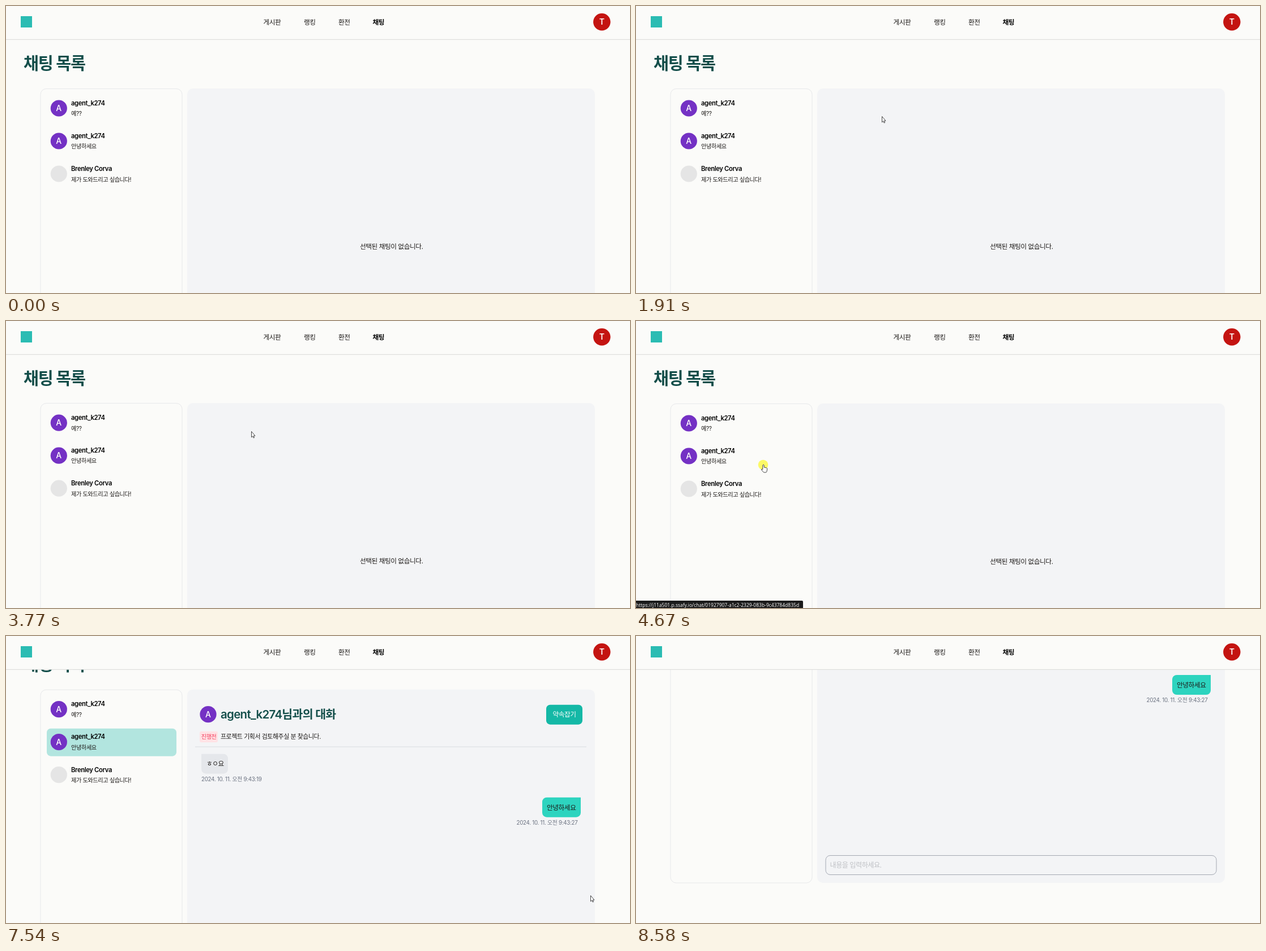
An HTML page that plays this animation: 1102 by 508 pixels, repeating every 9.11 s.

```html
<!DOCTYPE html>
<html lang="ko">
<head>
<meta charset="utf-8">
<title>채팅 목록</title>
<style>
  html, body { margin: 0; width: 100%; height: 100%; overflow: hidden; background: #fbfbf9; }
  svg { display: block; width: 1102px; height: 508px; }
  text { font: 11.7px Inter, "Noto Sans CJK KR", sans-serif; letter-spacing: -.04em; fill: #1c1917; }
  .title { font-size: 29.3px; font-weight: 700; fill: #134e4a; }
  .heading { font-size: 20.5px; font-weight: 600; fill: #134e4a; letter-spacing: -.035em; }
  .name { font-size: 11.2px; font-weight: 600; fill: #000; letter-spacing: -.03em; }
  .small { font-size: 10.2px; }
  .date { font-size: 9.8px; fill: #6b7280; letter-spacing: -.03em; }
  .initial { font-size: 14px; font-weight: 500; fill: #fff; text-anchor: middle; letter-spacing: 0; }
  .link { font: 8.5px "Open Sans", "Noto Sans", sans-serif; fill: #fff; letter-spacing: 0; }
</style>
</head>
<body>
<svg viewBox="0 0 1102 508">
  <defs>
    <g id="avatar">
      <circle r="14.6" fill="#7431c4"/>
      <text class="initial" y="5.2">A</text>
    </g>
  </defs>

  <g id="page">
    <text class="title" x="31" y="112.3">채팅 목록</text>
    <rect x="61" y="146.5" width="250" height="558.5" rx="10" fill="none" stroke="#e7e8ea"/>
    <rect x="320" y="146" width="720" height="559" rx="10" fill="#f3f4f6"/>

    <rect class="chat" x="72" y="215" width="229" height="49" rx="7" fill="#b2e5df"/>
    <use href="#avatar" x="93.3" y="181"/>
    <text class="name" x="115" y="175.8">agent_k274</text>
    <text class="small" x="115" y="194.3">예??</text>
    <use href="#avatar" x="93.3" y="239"/>
    <text class="name" x="115" y="233.8">agent_k274</text>
    <text class="small" x="115" y="252.1">안녕하세요</text>
    <circle cx="93.3" cy="297" r="14.6" fill="#e5e5e5"/>
    <text class="name" x="115" y="292">Brenley Corva</text>
    <text class="small" x="115" y="310.5">제가 도와드리고 싶습니다!</text>

    <text id="empty" x="625" y="429.7">선택된 채팅이 없습니다.</text>

    <g class="chat">
      <use href="#avatar" x="357" y="190"/>
      <text class="heading" x="379" y="197.3">agent_k274님과의 대화</text>
      <rect x="954" y="173" width="64" height="35" rx="7" fill="#14b8a6"/>
      <text x="965.5" y="194.4" style="fill:#fff">약속잡기</text>
      <rect x="342" y="220" width="32" height="19.5" rx="3" fill="#ffe2e5"/>
      <text class="small" x="344.7" y="233.3" style="fill:#f43f5e">진행전</text>
      <text x="379" y="233.5" style="font-size:10.95px">프로젝트 기획서 검토해주실 분 찾습니다.</text>
      <path d="M334 247.5H1025" stroke="#d8dbe0"/>

      <path d="M345 260H384a8 8 0 0 1 8 8V287a8 8 0 0 1-8 8H353a8 8 0 0 1-8-8Z" fill="#e5e7eb"/>
      <text x="354" y="281.8">ㅎㅇ요</text>
      <text class="date" x="345" y="308">2024. 10. 11. 오전 9:43:19</text>
      <path d="M1015 337V364a8 8 0 0 1-8 8H955a8 8 0 0 1-8-8V345a8 8 0 0 1 8-8Z" fill="#2dd4bf"/>
      <text x="955" y="358.9">안녕하세요</text>
      <text class="date" x="901.5" y="385">2024. 10. 11. 오전 9:43:27</text>

      <rect x="335" y="656.5" width="690" height="34" rx="8" fill="none" stroke="#a3a8b2"/>
      <text x="342.5" y="678" style="font-size:12.1px;fill:#bfc1c5">내용을 입력하세요.</text>
    </g>
  </g>

  <rect width="1102" height="59" fill="#fbfbf9"/>
  <path d="M0 59.3H1102" stroke="#d9d9d7"/>
  <rect x="26" y="18" width="20" height="20" fill="#2bbcb3"/>
  <text x="454.5" y="32.8">게시판</text>
  <text x="526" y="32.8">랭킹</text>
  <text x="587" y="32.8">환전</text>
  <text x="647.5" y="32.8" style="font-weight:700;fill:#000">채팅</text>
  <circle cx="1052.3" cy="28.3" r="15.2" fill="#c41411"/>
  <text class="initial" x="1052.3" y="33.4" style="font-weight:600">T</text>

  <g id="status">
    <path d="M0 495H293a2 2 0 0 1 2 2V508H0Z" fill="#1b1b1b"/>
    <text class="link" x="0" y="505.6">https://j11a501.p.ssafy.io/chat/01927907-a1c2-2329-083b-9c43784d835d</text>
  </g>
  <circle id="click" cx="224.5" cy="254.5" r="8.8" fill="#fcf84e" opacity=".85"/>
  <g id="cursor" fill="#fff" stroke="#333" stroke-width=".9" stroke-linejoin="round">
    <path id="arrow" d="M.5 .5V10.8L2.7 8.8L4.2 12L5.6 11.4L4.2 8.2H7Z"/>
    <path id="hand" d="M-1.2 1.2Q0-.8 1.2 1.2V5L5.8 6Q6.9 6.4 6.7 8L6 12.2Q5.6 14 4 14H.6L-3.8 9Q-3.6 7.4-1.2 8.8Z"/>
  </g>
</svg>

<script>
const LOOP = 9110, DEPTH = 268, CHAT_OPENS = 4790;
const $ = id => document.getElementById(id);
const chatParts = document.querySelectorAll('.chat');

// time, x, y of the pointer tip
const path = [
  [590, 838, 494], [800, 620, 380], [1000, 380, 240], [1150, 250, 158], [1350, 190, 185],
  [1490, 235, 225], [1640, 380, 240], [1770, 473, 222], [1900, 434, 195], [2190, 434, 195],
  [2260, 433, 195], [3800, 433, 195], [4100, 380, 212], [4350, 270, 244], [4580, 225, 254],
  [5560, 225, 254], [5850, 320, 278], [6150, 500, 296], [6440, 683, 308], [6510, 745, 325],
  [6580, 815, 346], [6720, 980, 430], [6800, 1093, 495], [6920, 1032, 459], [8180, 1032, 459],
  [8510, 1062, 492], [8580, 1062, 492]
];

const show = (el, on) => el.style.display = on ? '' : 'none';

function ease(t, start, end) {
  const p = Math.min(1, Math.max(0, (t - start) / (end - start)));
  return p < .5 ? 2 * p * p : 1 - 2 * (1 - p) ** 2;
}

function pointerAt(t) {
  const i = path.findIndex(point => point[0] > t);
  if (i < 1) return null;
  const [t0, x0, y0] = path[i - 1], [t1, x1, y1] = path[i];
  const p = (t - t0) / (t1 - t0);
  return [x0 + (x1 - x0) * p, y0 + (y1 - y0) * p];
}

function overRow(x, y) {
  const dy = y - 157;
  return x > 72 && x < 301 && dy >= 0 && dy < 165 && dy % 58 < 49;
}

function draw(now) {
  const t = now % LOOP;
  const scroll = DEPTH * (ease(t, 2150, 2750) - ease(t, 3040, 3800) + ease(t, 7250, 8190));
  $('page').setAttribute('transform', `translate(0 ${-scroll})`);

  const chatOpen = t >= CHAT_OPENS;
  chatParts.forEach(el => show(el, chatOpen));
  show($('empty'), !chatOpen);

  const tip = pointerAt(t);
  const hover = !!tip && overRow(tip[0], tip[1] + scroll);
  show($('cursor'), tip);
  if (tip) $('cursor').setAttribute('transform', `translate(${tip})`);
  show($('arrow'), !hover);
  show($('hand'), hover);
  show($('status'), hover);
  show($('click'), t >= 4600 && t < 4735);
  requestAnimationFrame(draw);
}
draw(0);
</script>
</body>
</html>
```
